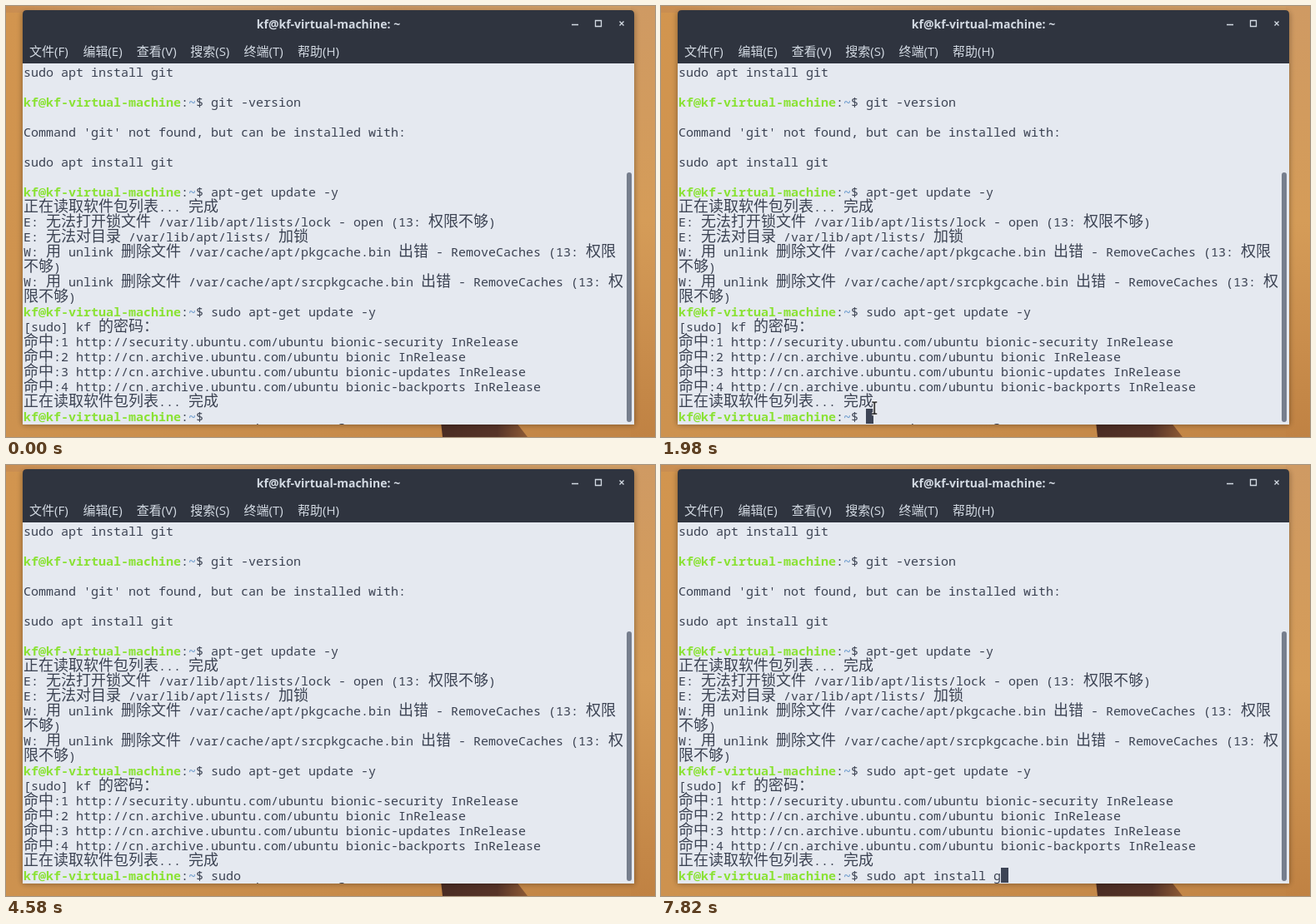
An HTML page for the animation above (8 s loop, 779 by 518 pixels).

```html
<!DOCTYPE html>
<html lang="zh-CN">
<head>
<meta charset="utf-8">
<title>Terminal</title>
<style>
  html, body { margin: 0; width: 100%; height: 100%; overflow: hidden; background: #cb8f4c; }
  svg { display: block; width: 779px; height: 518px; }
  text { white-space: pre; }
  .row { font: 15px "Noto Sans Mono", "DejaVu Sans Mono", monospace; fill: #3b4252; }
  .cjk { font: 18px "Noto Sans CJK SC", "Noto Sans CJK", sans-serif; }
  .host { font-weight: 700; fill: #8ae234; }
  .path { font-weight: 700; fill: #729fcf; }
  .title { font: 700 14px "Open Sans", "Noto Sans", sans-serif; fill: #d3dae3; text-anchor: middle; }
  .menu { font: 15px "Open Sans", "Noto Sans CJK SC", "Noto Sans CJK", sans-serif; fill: #d3dae3; }

  .caret, .block, .mouse, .beam, .hand { animation: 8s -2ms step-end infinite; }
  .caret { animation-name: type; }
  .block { animation-name: blink; }
  .mouse { animation-name: move; animation-timing-function: linear; }
  .beam { animation-name: beam; }
  .hand { animation-name: hand; }

  /* the caret hides the part of the command that is not typed yet */
  @keyframes type {
    0% { transform: none; }
    33.75% { transform: translateX(9px); }
    36.75% { transform: translateX(18px); }
    39.25% { transform: translateX(27px); }
    42% { transform: translateX(36px); }
    46.5% { transform: translateX(45px); }
    63% { transform: translateX(54px); }
    64.75% { transform: translateX(63px); }
    67.5% { transform: translateX(72px); }
    71% { transform: translateX(81px); }
    75.25% { transform: translateX(90px); }
    77.25% { transform: translateX(99px); }
    78.75% { transform: translateX(108px); }
    81.75% { transform: translateX(117px); }
    82.75% { transform: translateX(126px); }
    86.25% { transform: translateX(135px); }
    87.5% { transform: translateX(144px); }
    91.5% { transform: translateX(153px); }
    97.75%, 100% { transform: translateX(162px); }
  }
  @keyframes blink {
    0%, 5.75%, 15.75%, 25.75%, 44.25%, 51.75%, 57.25%, 96.25% { opacity: 0; }
    .5%, 10.75%, 20.75%, 29.75%, 46.5%, 52.5%, 62.25%, 97%, 100% { opacity: 1; }
  }
  @keyframes move {
    0%, .5% { transform: translate(728px, 105px); animation-timing-function: cubic-bezier(.33, .52, .67, .84); }
    4% { transform: translate(295px, 431px); animation-timing-function: cubic-bezier(.33, .84, .67, 1); }
    7%, 19.5% { transform: translate(224px, 491px); }
    20.5% { transform: translate(212px, 496px); }
    21.75% { transform: translate(203px, 484px); }
    22.75% { transform: translate(211px, 470px); }
    23.75% { transform: translate(234px, 466px); }
    24.75% { transform: translate(256px, 483px); }
    26.25%, 100% { transform: translate(264px, 490px); }
  }
  @keyframes beam {
    0%, 3.25%, 47%, 100% { opacity: 0; }
    .5%, 4.75% { opacity: 1; }
  }
  @keyframes hand {
    0%, 4.75%, 100% { opacity: 0; }
    3.25% { opacity: 1; }
  }
</style>
</head>
<body>
<svg viewBox="0 0 779 518">
  <defs>
    <linearGradient id="sand" x2="1" y2="1">
      <stop offset="0" stop-color="#d2954f"/>
      <stop offset=".5" stop-color="#cd924f"/>
      <stop offset="1" stop-color="#c18445"/>
    </linearGradient>
    <linearGradient id="cliff" x2="0" y2="1">
      <stop offset="0" stop-color="#cf9a63"/>
      <stop offset=".5" stop-color="#d59c58"/>
      <stop offset="1" stop-color="#c08243"/>
    </linearGradient>
    <linearGradient id="sky">
      <stop offset="0" stop-color="#c98d50"/>
      <stop offset=".25" stop-color="#d5a472"/>
      <stop offset=".6" stop-color="#c6935f"/>
      <stop offset="1" stop-color="#d2a067"/>
    </linearGradient>
    <linearGradient id="shade">
      <stop offset="0" stop-color="#4a2c23"/>
      <stop offset=".65" stop-color="#573428"/>
      <stop offset="1" stop-color="#8d5a35"/>
    </linearGradient>
    <filter id="soft" x="-5%" y="-5%" width="110%" height="110%"><feGaussianBlur stdDeviation="3"/></filter>
  </defs>

  <rect width="779" height="518" fill="url(#sand)"/>
  <rect width="779" height="8" fill="url(#sky)"/>
  <rect x="750" width="29" height="518" fill="url(#cliff)"/>
  <path d="M522 500H612L626 518H524Z" fill="url(#shade)"/>
  <rect x="19" y="7" width="736" height="497" rx="4" opacity=".3" filter="url(#soft)"/>

  <path d="M20 503V10Q20 5 25 5H749Q754 5 754 10V503Z" fill="#2f343f"/>
  <rect x="20" y="69" width="734" height="434" fill="#e5e9f0"/>
  <rect x="745" y="200" width="6" height="300" rx="3" fill="#767e8d"/>
  <text class="title" x="387" y="27">kf@kf-virtual-machine: ~</text>
  <path d="M679 22.5H687M707.5 17.5H714.5V24.5H707.5ZM736.5 18.5L741.5 23.5M741.5 18.5L736.5 23.5"
        fill="none" stroke="#d3dae3" stroke-width="1.3"/>
  <g id="menus"></g>
  <g id="rows"></g>

  <g class="caret">
    <rect x="246" y="484" width="300" height="18" fill="#e5e9f0"/>
    <rect class="block" x="246" y="484" width="9" height="18" fill="#3d4455"/>
  </g>

  <g class="mouse">
    <g class="beam" fill="none">
      <path id="ibeam" d="M-3-7H-1Q0-7 0-6V6Q0 7-1 7H-3M3-7H1Q0-7 0-6M0 6Q0 7 1 7H3" stroke="#fff" stroke-width="3.4"/>
      <use href="#ibeam" style="stroke-width:1.6"/>
      <path d="M-3-7H-1Q0-7 0-6V6Q0 7-1 7H-3M3-7H1Q0-7 0-6M0 6Q0 7 1 7H3" stroke="#111" stroke-width="1.6"/>
    </g>
    <path class="hand" fill="#fff" stroke="#222" stroke-width="1.2" stroke-linejoin="round"
          d="M-2 .5C-2-1.5 2-1.5 2 .5V8C3 6.5 5.5 7 5.5 8.5C7 7.5 8.5 8 8.5 9.5C10 9 11 10 11 11.5V15C11 18 9 19 9 21.5H-1C-1 19-5 16-6.5 13C-7.5 11-5 9.5-2 13Z"/>
  </g>
</svg>
<script>
  const CELL = 9, LEFT = 21, LINE = 18, FIRST_BASELINE = 85;
  const HOST = 'kf@kf-virtual-machine';

  const menus = ['文件(F)', '编辑(E)', '查看(V)', '搜索(S)', '终端(T)', '帮助(H)'];
  // a leading "$ " stands for the whole prompt
  const rows = [
    'sudo apt install git',
    '',
    '$ git -version',
    '',
    "Command 'git' not found, but can be installed with:",
    '',
    'sudo apt install git',
    '',
    '$ apt-get update -y',
    '正在读取软件包列表... 完成',
    'E: 无法打开锁文件 /var/lib/apt/lists/lock - open (13: 权限不够)',
    'E: 无法对目录 /var/lib/apt/lists/ 加锁',
    'W: 用 unlink 删除文件 /var/cache/apt/pkgcache.bin 出错 - RemoveCaches (13: 权限',
    '不够)',
    'W: 用 unlink 删除文件 /var/cache/apt/srcpkgcache.bin 出错 - RemoveCaches (13: 权',
    '限不够)',
    '$ sudo apt-get update -y',
    '[sudo] kf 的密码：',
    '命中:1 http://security.ubuntu.com/ubuntu bionic-security InRelease',
    '命中:2 http://cn.archive.ubuntu.com/ubuntu bionic InRelease',
    '命中:3 http://cn.archive.ubuntu.com/ubuntu bionic-updates InRelease',
    '命中:4 http://cn.archive.ubuntu.com/ubuntu bionic-backports InRelease',
    '正在读取软件包列表... 完成',
    '$ sudo apt install g'
  ];

  function addNode(parent, tag, attrs, content = '') {
    const node = document.createElementNS('http://www.w3.org/2000/svg', tag);
    for (const key in attrs) node.setAttribute(key, attrs[key]);
    node.textContent = content;
    return parent.appendChild(node);
  }

  function addRow(row, index) {
    const text = addNode(document.getElementById('rows'), 'text',
      { class: 'row', y: FIRST_BASELINE + index * LINE });
    let column = 0;

    // wide characters take two cells
    const put = (run, kind) => {
      const wide = run.charCodeAt(0) > 127;
      const indent = run.length - run.trimStart().length;
      addNode(text, 'tspan',
        { x: LEFT + (column + indent) * CELL, class: kind || (wide ? 'cjk' : '') }, run.trim());
      column += run.length * (wide ? 2 : 1);
    };

    if (row.startsWith('$')) {
      put(HOST, 'host');
      put(':');
      put('~', 'path');
    }
    (row.match(/[\x00-\x7f]+|[^\x00-\x7f]+/g) || []).forEach(run => put(run));
  }

  menus.forEach((label, i) =>
    addNode(document.getElementById('menus'), 'text', { class: 'menu', x: 28 + i * 64.4, y: 60 }, label));
  rows.forEach(addRow);
</script>
</body>
</html>
```
